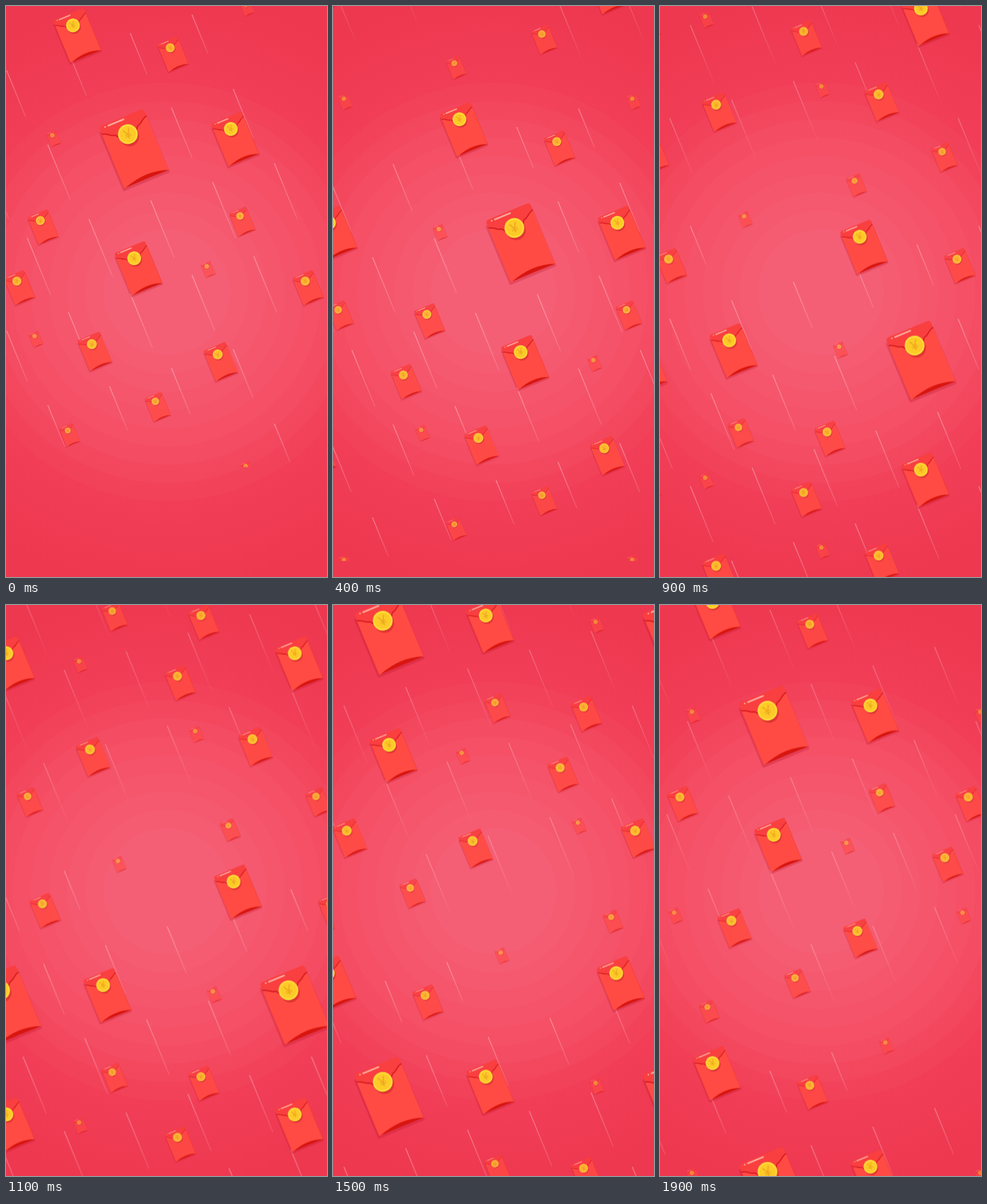
Recreate the animation shown at these times as an HTML page. Size 561x998 px, loop 2000 ms.

```html
<!DOCTYPE html>
<html lang="en">
<head>
<meta charset="utf-8">
<title>Red envelope rain</title>
<style>
  html, body { margin: 0; width: 100%; height: 100%; overflow: hidden; background: #ee3850; }
  svg { display: block; width: 100vw; height: 100vh; }
  text { font: 23px "Liberation Sans", Arial, sans-serif; }
  /* The pattern drifts by exactly one tile (504 x 806) per loop, ten poses a second. */
  #rain { animation: fall 2s -20ms infinite; }
  @keyframes fall {
    0%   { transform: translate(0, 0); animation-timing-function: steps(6); }
    30%  { transform: translate(156px, 246px); animation-timing-function: steps(3); }
    45%  { transform: translate(232px, 369.5px); animation-timing-function: steps(6); }
    75%  { transform: translate(378px, 609.5px); animation-timing-function: steps(5); }
    100% { transform: translate(504px, 806px); }
  }
</style>
</head>
<body>
<svg viewBox="0 0 561 998" preserveAspectRatio="none">
  <defs>
    <radialGradient id="glow" gradientUnits="userSpaceOnUse" cx="281" cy="500" r="520">
      <stop offset=".5" stop-color="#f5415a"/>
      <stop offset=".75" stop-color="#f13d56"/>
      <stop offset="1" stop-color="#ee3850"/>
    </radialGradient>
    <linearGradient id="near" x2="1" y2="1">
      <stop offset="0" stop-color="#fff" stop-opacity=".32"/>
      <stop offset="1" stop-color="#fff" stop-opacity=".12"/>
    </linearGradient>
    <linearGradient id="far" x2="1" y2="1">
      <stop offset="0" stop-color="#fff" stop-opacity=".26"/>
      <stop offset="1" stop-color="#fff" stop-opacity=".03"/>
    </linearGradient>
    <clipPath id="edge"><rect x="-700" y="-1000" width="2100" height="1806"/></clipPath>

    <!-- Origin is the centre of the coin. -->
    <g id="envelope">
      <path d="M-43-20V87H40V-18Z" fill="#b8142c" stroke="#b8142c" stroke-width="5" stroke-linejoin="round" opacity=".3"/>
      <path d="M-42-10H42V85Q4 84-40 85Z" fill="#d8150f"/>
      <path d="M-42-18H42V85Q4 70-39 85Q-42 86-42 82Z" fill="#ff4b43"/>
      <path d="M-42-25Q-42-31-36-31H36Q42-31 42-25V-18C33-17 30-9 22-8C16-6 12 16 0 16S-16-6-22-8C-30-9-33-17-42-18Z" fill="#f93f3f"/>
      <path d="M-42-17C-33-16-30-8-22-7C-16-5-12 17 0 17S16-5 22-7C30-8 33-16 42-17" fill="none" stroke="#d31720" stroke-width="2"/>
      <path d="M-32-26.8h.1M-26-26.8H3" stroke="#ffaea6" stroke-width="2.8" stroke-linecap="round"/>
      <circle cx="1" cy="5" r="17" fill="#b31420" opacity=".4"/>
      <circle r="17.3" fill="#fddc38"/>
      <circle r="14.3" fill="#fdca28"/>
      <text y="8" text-anchor="middle" fill="#eda51e">¥</text>
    </g>
  </defs>
  <rect width="561" height="998" fill="url(#glow)"/>
  <g id="rings" fill="#fff" fill-opacity=".018"></g>
  <g id="rain" clip-path="url(#edge)"></g>
</svg>
<script>
  const TILE_W = 504, TILE_H = 806, LONG = 103, SLOPE = .41;
  const times = (n, make) => Array.from({ length: n }, (_, i) => make(i)).join('');
  const fill = (id, markup) => { document.getElementById(id).innerHTML = markup; };

  // Envelope centres by size; smaller ones are further away and paler.
  const depths = [
    { scale: .215, at: '81,226 351,455 50,577 419,804' },
    { scale: .3, at: '108,742' },
    { scale: .38, at: '409,367 261,691' },
    { scale: .45, at: '287,73 60,375 523,481' },
    { scale: .5, at: '150,591 370,609' },
    { scale: .69, at: '393,215 117,34 224,441' },
    { scale: 1, at: '213,224' }
  ];

  const envelopes = depths.map(({ scale, at }) => at.split(' ').map(point =>
    `<use href="#envelope" opacity="${Math.min(1, .3 + 1.2 * scale)}"
      transform="translate(${point}) rotate(-22.5) scale(${scale})"/>`).join('')).join('');

  // Streaks sit on a slanted lattice that wraps across the tile.
  function streak(i, upper) {
    const x = (325 + 396 * i) % TILE_W, y = 15 + 32.5 * i;
    const h = upper ? LONG : 68 + 32 * Math.sin(Math.PI * i / 22);
    return `<path d="M${x} ${y}l${h * SLOPE} ${h}" stroke="url(#${upper ? 'far' : 'near'})" stroke-width="1.8"/>`;
  }

  function tile(col, row) {
    const upper = row < 0;
    return `<g transform="translate(${col * TILE_W} ${row * TILE_H})">` +
      times(upper ? 20 : 23, i => streak(i, upper)) + envelopes + '</g>';
  }

  fill('rings', times(9, i => `<circle cx="281" cy="500" r="${110 + 32 * i}"/>`));
  fill('rain', times(4, i => tile(i % 2 - 1, (i >> 1) - 1)));
</script>
</body>
</html>
```
